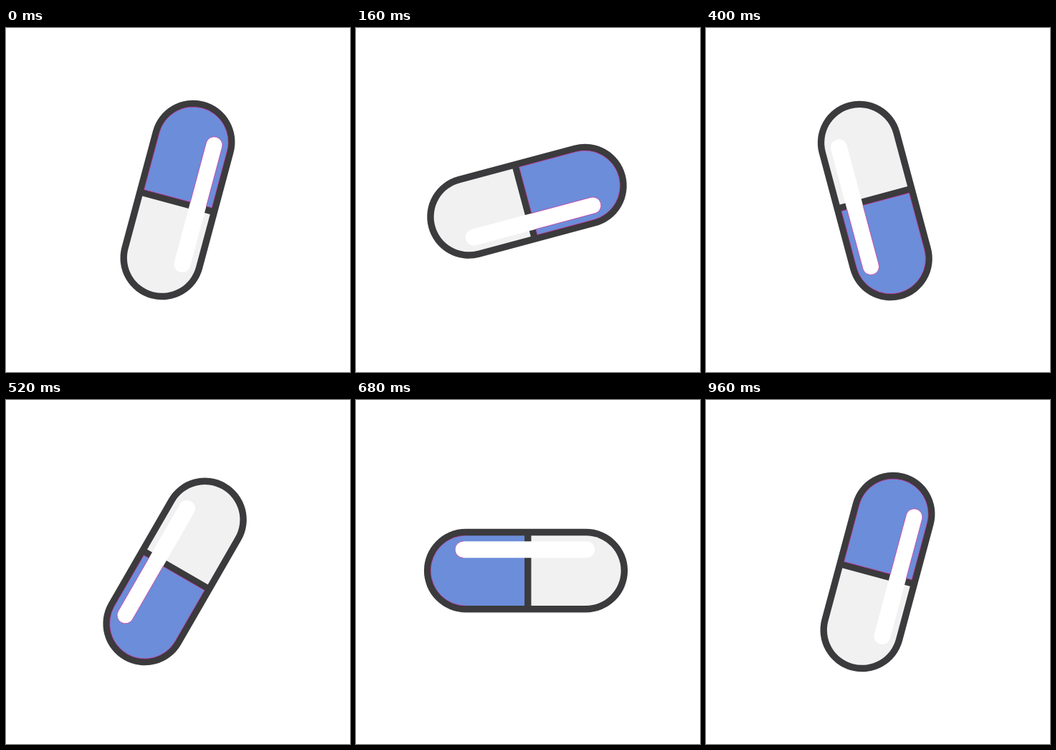
An HTML page for the animation above (1000 ms loop, 480 by 480 pixels).

```html
<!DOCTYPE html>
<html lang="en">
<head>
<meta charset="utf-8">
<title>Spinning capsule</title>
<style>
  html, body { margin: 0; height: 100%; overflow: hidden; background: #fff; }
  svg { display: block; width: 100vw; height: 100vh; }
  .round { stroke-linecap: round; }
  .rim { fill: none; stroke: #d0359f; stroke-width: .7; }
</style>
</head>
<body>
<svg viewBox="0 0 480 480">
  <g id="pill">
    <path class="round" d="M0 -83.8V83.8" stroke="#3b3a3c" stroke-width="116.6"/>
    <path d="M-48.9 7.5V83.8A48.9 48.9 0 0 0 48.9 83.8V7.5Z" fill="#f1f1f1"/>
    <path d="M-48.9 -1.9V-83.8A48.9 48.9 0 0 1 48.9 -83.8V-1.9Z" fill="#6c8dd9"/>
    <path class="round" d="M29.4 -87.3V84.7" stroke="#fff" stroke-width="23"/>
    <!-- thin coloured rim around the blue half -->
    <path class="rim" d="M-48.9 -83.8A48.9 48.9 0 0 1 48.9 -83.8M17.9 -87.3A11.5 11.5 0 0 1 40.9 -87.3"/>
    <path class="rim" id="sides" d="M-48.9 -83.8V-1.9H17.9V-87.3M40.9 -87.3V-1.9H48.9V-83.8"/>
  </g>
</svg>
<script>
  const pill = document.getElementById('pill');
  const sides = document.getElementById('sides');
  const LOOP = 1000, STEP = 40, TURN = 15;

  function draw(now) {
    const angle = TURN * (1 + Math.floor(now % LOOP / STEP));
    // the capsule sits slightly off the pivot
    pill.setAttribute('transform', `translate(237.5 240) rotate(${angle}) translate(1.9 -.5)`);
    // straight rims vanish when the capsule is level or upright
    sides.style.display = angle % 90 ? '' : 'none';
  }

  const start = performance.now();
  function tick() {
    draw(performance.now() - start);
    requestAnimationFrame(tick);
  }
  tick();
</script>
</body>
</html>
```
